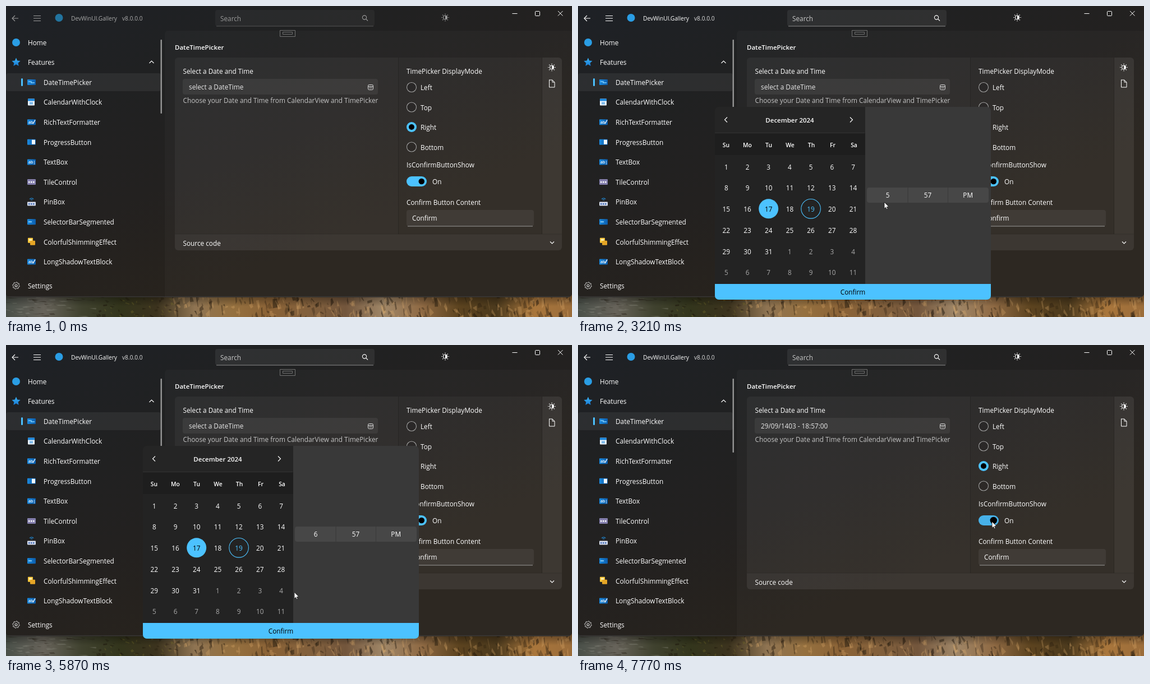
Animation of 1009 by 555 pixels, one loop 8 s. Source, as an HTML page with a canvas:

```html
<!DOCTYPE html>
<html lang="en">
<head>
<meta charset="utf-8">
<title>DateTimePicker</title>
<style>
html, body { margin: 0; width: 100%; height: 100%; overflow: hidden; background: #202020; }
canvas { display: block; }
</style>
</head>
<body>
<canvas id="stage" width="1009" height="555"></canvas>
<script>
const LOOP = 8000, W = 1009, H = 555, ACCENT = '#4cc2ff', PITCH = 35.5;
const stage = document.getElementById('stage');
let c = stage.getContext('2d');

// time, x, y of the pointer tip
const pointerPath = [
  [500, 760, 560], [940, 561, 142], [1700, 561, 142], [1760, 546, 186], [2200, 418, 361],
  [2520, 410, 364], [2700, 383, 362], [2900, 420, 360], [3150, 553, 352], [3210, 546, 350],
  [3350, 548, 347], [3620, 695, 331], [4450, 695, 331], [4640, 552, 372], [4780, 552, 372],
  [5000, 576, 500], [5090, 579, 512], [5230, 579, 512], [5600, 560, 349], [6070, 485, 499],
  [6210, 486, 501], [6700, 486, 501], [7220, 416, 215], [7350, 416, 215], [7770, 738, 315]
];
const clicks = [[1010, 1130], [2300, 2400], [3950, 4030], [4660, 4740], [5130, 5210], [6540, 6650]];

const ramp = (t, a, b) => Math.min(1, Math.max(0, (t - a) / (b - a)));
const easeOut = k => 1 - (1 - k) ** 3;
const smooth = k => k * k * (3 - 2 * k);
const white = a => `rgba(255,255,255,${a})`;
const black = a => `rgba(0,0,0,${a})`;

function pointerAt(t) {
  if (t < pointerPath[0][0]) return null;
  const i = pointerPath.findIndex(p => p[0] > t);
  if (i < 0) return pointerPath.at(-1).slice(1);
  const [t0, x0, y0] = pointerPath[i - 1], [t1, x1, y1] = pointerPath[i];
  const k = smooth(ramp(t, t0, t1));
  return [x0 + (x1 - x0) * k, y0 + (y1 - y0) * k];
}

// y is the middle of the line; baselines sit on whole pixels
function text(s, x, y, color = '#fff', size = 11.8, weight = 400, align = 'left') {
  c.font = `${weight} ${size}px "Open Sans", "Noto Sans", sans-serif`;
  c.textAlign = align;
  c.fillStyle = color;
  c.fillText(s, x, Math.round(y + size * 0.4));
}
const centered = (s, x, y, color, size, weight) => text(s, x, y, color, size, weight, 'center');

function box(x, y, w, h, color, r = 0) {
  c.fillStyle = color;
  c.beginPath();
  c.roundRect(x, y, w, h, r);
  c.fill();
}
function frame(x, y, w, h, color, r = 0) {
  c.strokeStyle = color;
  c.lineWidth = 1;
  c.beginPath();
  c.roundRect(x + .5, y + .5, w - 1, h - 1, r);
  c.stroke();
}
function disc(x, y, r, fill, stroke) {
  c.beginPath();
  c.arc(x, y, r, 0, 7);
  if (fill) { c.fillStyle = fill; c.fill(); }
  if (stroke) { c.strokeStyle = stroke; c.lineWidth = 1.1; c.stroke(); }
}
function line(points, color = '#fff', width = 1.1) {
  c.strokeStyle = color;
  c.lineWidth = width;
  c.beginPath();
  for (let i = 0; i < points.length; i += 2) c.lineTo(points[i], points[i + 1]);
  c.stroke();
}
function clipped(x, y, w, h, r, draw) {
  c.save();
  c.beginPath();
  c.roundRect(x, y, w, h, r);
  c.clip();
  draw();
  c.restore();
}
function gradient(x0, y0, x1, y1, colors) {
  const g = c.createLinearGradient(x0, y0, x1, y1);
  colors.forEach((color, i) => g.addColorStop(i / (colors.length - 1), color));
  return g;
}

// rocky landscape below the window: fields, trees, then cliffs
function makeCliffs() {
  const art = document.createElement('canvas');
  art.width = W;
  art.height = 60;
  const main = c;
  let seed = 7;
  const rnd = () => (seed = seed * 16807 % 2147483647) / 2147483647;
  c = art.getContext('2d');
  box(0, 0, W, 60, gradient(0, 0, W, 0, ['#4a5049', '#67635a', '#40422f', '#33351c', '#3c331e', '#8f7452',
    '#95703f', '#8a6236', '#82603c', '#73563c', '#a08768', '#8f6a44', '#5c431f', '#4c3a1d', '#a9763c', '#9a6c3a']));
  for (let i = 0; i < 420; i++) {
    const x = rnd() * W, y = 15 + rnd() * 45, far = x < 160, trees = x < 300;
    const w = far ? 6 + rnd() * 16 : 2 + rnd() * 7, h = far ? 1 + rnd() * 2 : trees ? 2 + rnd() * 5 : 4 + rnd() * 16;
    c.fillStyle = rnd() < .6 ? `rgba(28,20,10,${.15 + rnd() * .35})` : far ? 'rgba(165,165,150,.25)'
      : trees ? 'rgba(130,120,45,.3)' : 'rgba(225,175,110,.28)';
    c.beginPath();
    c.moveTo(x - w / 2, y - h / 2 * rnd());
    c.lineTo(x + w * (rnd() - .5), y - h / 2);
    c.lineTo(x + w / 2, y + h / 2 * rnd());
    c.lineTo(x + w * (rnd() - .5), y + h / 2);
    c.fill();
  }
  box(0, 0, W, 60, gradient(0, 18, 0, 36, [black(.35), black(0)]));
  c = main;
  return art;
}
const cliffs = makeCliffs();

function sun(x, y, color) {
  disc(x, y, 3.5, null, color);
  c.beginPath();
  c.arc(x, y, 3.5, -Math.PI / 2, Math.PI / 2);
  c.fillStyle = color;
  c.fill();
  for (let i = 0; i < 8; i++) {
    const a = i * Math.PI / 4, u = Math.cos(a), v = Math.sin(a);
    line([x + u * 5.2, y + v * 5.2, x + u * 6.8, y + v * 6.8], color, 1.2);
  }
}

function star(x, y) {
  c.beginPath();
  for (let i = 0; i < 10; i++) {
    const a = i * Math.PI / 5 - Math.PI / 2, r = i % 2 ? 3.8 : 8;
    c.lineTo(x + Math.cos(a) * r, y + Math.sin(a) * r);
  }
  c.fillStyle = gradient(x, y - 8, x, y + 8, ['#3cb4f5', '#1474d0']);
  c.fill();
}

function gear(x, y) {
  c.strokeStyle = '#ddd';
  c.lineWidth = 1;
  c.beginPath();
  for (let i = 0; i <= 48; i++) {
    const a = i * Math.PI / 24, r = 5.6 + .8 * Math.sin(a * 8);
    c.lineTo(x + Math.cos(a) * r, y + Math.sin(a) * r);
  }
  c.stroke();
  disc(x, y, 2, null, '#ddd');
}

const blueTile = y => box(38, y - 5, 15, 10, gradient(38, 0, 53, 0, ['#1b8be0', '#0c5cab']), 1);
function letterTile(y, mark) {
  blueTile(y);
  text(mark, 40, y - .3, '#fff', 7, 600);
}
const navItems = [
  ['DateTimePicker', y => { blueTile(y); line([40, y - 1, 45, y - 1, 45, y + 1, 51, y + 1], '#7fd0ff', 1.5); }],
  ['CalendarWithClock', y => {
    box(39, y - 6, 12, 12, '#e8f2fb', 1);
    box(39, y - 6, 12, 4, '#1a86dc', 1);
    box(42, y, 6, 4, '#7ab8ea');
  }],
  ['RichTextFormatter', y => { letterTile(y, 'ab'); line([48, y + 3, 52, y - 4], '#fff', 1.3); }],
  ['ProgressButton', y => { blueTile(y); box(46, y - 4, 6, 8, '#f0f6fc'); }],
  ['TextBox', y => letterTile(y, 'ab|')],
  ['TileControl', y => {
    box(38, y - 5, 15, 10, '#8580ae', 1);
    for (let i = 0; i < 3; i++) box(40 + i * 4, y - 1, 2.5, 2.5, '#fff');
  }],
  ['PinBox', y => {
    box(38, y, 15, 7, '#d5dcec', 1);
    for (let i = 0; i < 3; i++) box(40 + i * 4, y + 2.5, 2.5, 2.5, '#3f68b4');
    for (const r of [2, 4.5]) {
      c.beginPath();
      c.arc(45.5, y - 2, r, -2.4, -.7);
      c.strokeStyle = '#1f8fe0';
      c.lineWidth = 1.2;
      c.stroke();
    }
  }],
  ['SelectorBarSegmented', y => { blueTile(y); line([40, y, 46, y], '#a5e0ff', 1.6); }],
  ['ColorfulShimmingEffect', y => {
    box(39, y - 7, 9, 9, '#f7c83c', 1);
    box(43, y - 2, 9, 8, '#e5a526', 1);
    box(41, y - 5, 5, 3, '#fff0b8');
  }],
  ['LongShadowTextBlock', y => { letterTile(y, 'ab'); line([48, y + 3, 52, y - 4], '#fff', 1.3); }]
];

function drawTitleBar(active) {
  const ink = active ? '#fff' : '#9b9b9b';
  line([22, 22, 11, 22], ink);
  line([16, 17, 11, 22, 16, 27], ink);
  for (const y of [17.5, 22, 26.5]) line([49, y, 62, y], ink);
  disc(94.5, 21, 7, active ? '#2a9de4' : '#22749f');
  text('DevWinUI.Gallery', 116, 21.5, active ? '#fff' : '#aaa', 10.2);
  text('v8.0.0.0', 207, 21.5, active ? '#ddd' : '#aaa', 10.2);
  box(373, 7, 284, 29, white(active ? .065 : .04), 4);
  line([375, 36, 655, 36], active ? '#8b8b8b' : '#555', 1);
  text('Search', 382, 22, active ? '#c8c8c8' : '#999');
  disc(639, 20.5, 3.6, null, ink);
  line([641.7, 23.2, 645, 26.5], ink);
  sun(783, 20.5, ink);
  line([902.5, 13.5, 911.5, 13.5], '#fff', 1);
  frame(943, 9, 9, 9, '#fff', 1);
  line([984, 9, 992.5, 17.5], '#fff', 1);
  line([984, 17.5, 992.5, 9], '#fff', 1);
}

function drawNavigation() {
  disc(18, 65, 7, '#2a9de4');
  text('Home', 39, 65);
  star(18, 100.5);
  text('Features', 39, 100.5);
  line([255.5, 102, 259.5, 98, 263.5, 102]);
  box(0, 120, 276, 32, white(.06), 4);
  box(27, 129, 3, 14, ACCENT, 1.5);
  navItems.forEach(([label, icon], i) => {
    const y = 136 + i * 35.6;
    icon(y);
    text(label, 67, y);
  });
  box(275.5, 60, 2.5, 132, '#929292', 1);
  gear(18, 499);
  text('Settings', 39, 499);
}

function drawContent(chosen, toggleHover) {
  frame(488, 43, 28, 12, '#707070');
  frame(493, 46, 18, 5, '#707070');
  text('DateTimePicker', 301, 73, '#fff', 11.5, 600);
  clipped(301, 92, 690, 344, 6, () => {
    box(301, 92, 398, 315, white(.045));
    box(699, 92, 257, 315, white(.03));
    box(956, 92, 35, 315, white(.075));
    box(301, 407, 690, 29, white(.07));
    line([699.5, 92, 699.5, 407], black(.16), 1);
    line([955.5, 92, 955.5, 407], black(.16), 1);
    line([301, 407, 991, 407], black(.16), 1);
  });
  text('Select a Date and Time', 315.5, 116);
  box(315, 130, 348, 28, white(.06), 4);
  text(chosen ? '29/09/1403 - 18:57:00' : 'select a DateTime', 326, 144, '#e8e8e8');
  frame(645, 140, 10, 10, '#ddd', 2);
  line([645, 143.5, 655, 143.5], '#ddd', 1);
  line([647, 146, 653, 146], '#ddd', 1);
  text('Choose your Date and Time from CalendarView and TimePicker', 315.5, 168.5, '#c4c4c4');

  text('TimePicker DisplayMode', 714, 116);
  ['Left', 'Top', 'Right', 'Bottom'].forEach((label, i) => {
    const y = 145 + i * 35.5;
    if (i === 2) {
      disc(723, y, 9, ACCENT);
      disc(723, y, 5, '#000');
    } else disc(723, y, 8.5, black(.1), '#a0a0a0');
    text(label, 739, y + .5);
  });
  text('IsConfirmButtonShow', 714, 283.5);
  box(714, 304, 36, 18, toggleHover ? '#47b1e8' : ACCENT, 9);
  disc(740.8, 313, toggleHover ? 6.2 : 5.3, '#000');
  text('On', 760, 313.5);
  text('Confirm Button Content', 714, 350);
  box(714, 364, 227, 29, white(.06), 4);
  line([716, 393, 939, 393], '#9a9a9a', 1);
  text('Confirm', 724, 378.5);
  text('Source code', 315.5, 423);
  line([970, 420.5, 973.5, 424, 977, 420.5]);
  sun(973, 109.5, '#fff');
  line([968.5, 132, 974, 132, 978, 136, 978, 145, 968.5, 145, 968.5, 131.5], '#fff', 1);
  line([974, 132, 974, 136, 978, 136], '#fff', 1);
}

function drawCalendar(picked, pointer) {
  box(244, 180, 268, 47, '#252525');
  box(244, 227, 268, 39, '#1e1e1e');
  box(244, 266, 268, 230, '#232323');
  line([244, 226.5, 511, 226.5], '#343434', 1);
  line([266, 198.5, 261.5, 203, 266, 207.5]);
  line([485, 198.5, 489.5, 203, 485, 207.5]);
  centered('December 2024', 377.5, 203, '#fff', 11.5, 600);
  ['Su', 'Mo', 'Tu', 'We', 'Th', 'Fr', 'Sa'].forEach((d, i) => centered(d, 264 + i * 38, 247.5, '#fff', 10.4, 600));
  for (let i = 0; i < 42; i++) {
    const x = 264.3 + i % 7 * 37.7, y = 287 + Math.floor(i / 7) * 37.75;
    let color = i < 31 ? '#fff' : '#a8a8a8';
    if (i === 16) {
      disc(x, y - .7, 17.5, ACCENT);
      if (!picked) disc(x, y - .7, 15.8, null, '#24516a');
      color = '#000';
    } else if (i === 18 && picked) {
      disc(x, y - .7, 17.3, null, ACCENT);
      color = ACCENT;
    } else if (Math.hypot(pointer[0] - x, pointer[1] - y) < 17) disc(x, y - .7, 17.3, null, '#777');
    centered(i % 31 + 1, x, y, color);
  }
}

function drawPopup(t, pointer) {
  const pressed = t >= 6540;
  const hover = t > 5210 && pointer[1] > 496 && pointer[1] < 524;
  clipped(244, 180, 492, 344, 7, () => {
    box(511, 180, 225, 316, '#393939');
    drawCalendar(t >= 2330, pointer);
    box(515, 324, 217, 27, '#474747', 4);
    for (const x of [588, 659.5]) line([x, 324, x, 351], '#393939', 1);
    [t < 5200 ? '5' : '6', '57', 'PM'].forEach((s, i) => centered(s, 552 + i * 71.6, 337));
    box(244, 496, 492, 28, pressed ? '#45a0d2' : hover ? '#49b3ea' : ACCENT);
    centered('Confirm', 490, 510.5, pressed ? '#255570' : '#000');
  });
}

function drawWheels(t) {
  const hour = 5 + easeOut(ramp(t, 4690, 4960)), mid = 337.5;
  const items = color => {
    for (let i = -6; i <= 6; i++) {
      const h = Math.round(hour) + i;
      centered((h + 11) % 12 + 1, 552, mid + (h - hour) * PITCH, color);
      centered(String((57 + i) % 60).padStart(2, '0'), 623.5, mid + i * PITCH, color);
    }
    centered('AM', 694.5, mid - PITCH, color);
    centered('PM', 695, mid, color);
  };
  const half = 18 + 176 * easeOut(ramp(t, 3940, 4250));
  const top = Math.max(179, mid - half), bottom = Math.min(531, mid + half);
  clipped(515, top, 216, bottom - top, 7, () => {
    box(515, 179, 216, 352, '#2c2c2c');
    clipped(515, 179, 216, 316, 0, () => items('#fff'));
    for (const x of [588, 659.5]) line([x, 179, x, 495], '#222', 1);
    line([515, 495.5, 731, 495.5], '#202020', 1);
    box(519, 320, 209, 35, ACCENT, 4);
    for (const x of [582, 654]) box(x, 320, 11, 35, 'rgba(40,120,170,.2)');
    clipped(519, 320, 209, 35, 4, () => items('#000'));
    const p = pointerAt(t);
    if (p[1] > 498 && p[0] < 621) box(520, 499, 100, 29, '#363636', 4);
    line([562.5, 513.5, 567, 518, 576.5, 508]);
    line([671.5, 508, 680.5, 517], '#fff');
    line([671.5, 517, 680.5, 508], '#fff');
    frame(515, 179, 216, 352, '#3a3a3a', 7);
  });
}

function drawPointer([x, y], t) {
  if (clicks.some(([a, b]) => t >= a && t < b)) disc(x, y, 11, 'rgba(204,194,5,.75)');
  c.beginPath();
  [[0, 0], [0, 11.5], [2.6, 9.2], [4.4, 13], [6.2, 12.2], [4.5, 8.5], [8, 8.2]].forEach(([u, v]) => c.lineTo(x + u, y + v));
  c.closePath();
  c.fillStyle = '#fff';
  c.fill();
  c.strokeStyle = '#111';
  c.lineWidth = .8;
  c.stroke();
}

function draw(t) {
  const pointer = pointerAt(t);
  const tint = t < 1100 ? 1 - ramp(t, 0, 800) : ramp(t, 1130, 1650);
  c.drawImage(cliffs, 0, 500);
  clipped(0, -10, W, 529.5, 7, () => {
    box(0, 0, W, 520, '#202020');
    c.globalAlpha = tint;
    box(0, 0, W, 520, gradient(0, 0, 220, 560, ['#1e2126', '#202122', '#232120', '#28231d']));
    c.globalAlpha = 1;
    box(282, 43, W, 480, white(.025), 7);
    frame(282, 43, W, 490, black(.15), 7);
    line([0, 519, W, 519], '#484848', 1);
    drawTitleBar(t >= 1130);
    drawNavigation();
    drawContent(t >= 6600, t > 7600);
  });
  const shown = easeOut(ramp(t, 1140, 1380)) * (1 - ramp(t, 6610, 6760));
  if (shown > 0) {
    c.save();
    c.globalAlpha = shown;
    if (t < 2000) c.translate(0, -24 * (1 - shown));
    drawPopup(t, pointer);
    c.restore();
  }
  if (t >= 3950 && t < 5210) drawWheels(t);
  if (pointer) drawPointer(pointer, t);
}

function tick(now) {
  draw(now % LOOP);
  requestAnimationFrame(tick);
}
draw(0);
requestAnimationFrame(tick);
</script>
</body>
</html>
```
